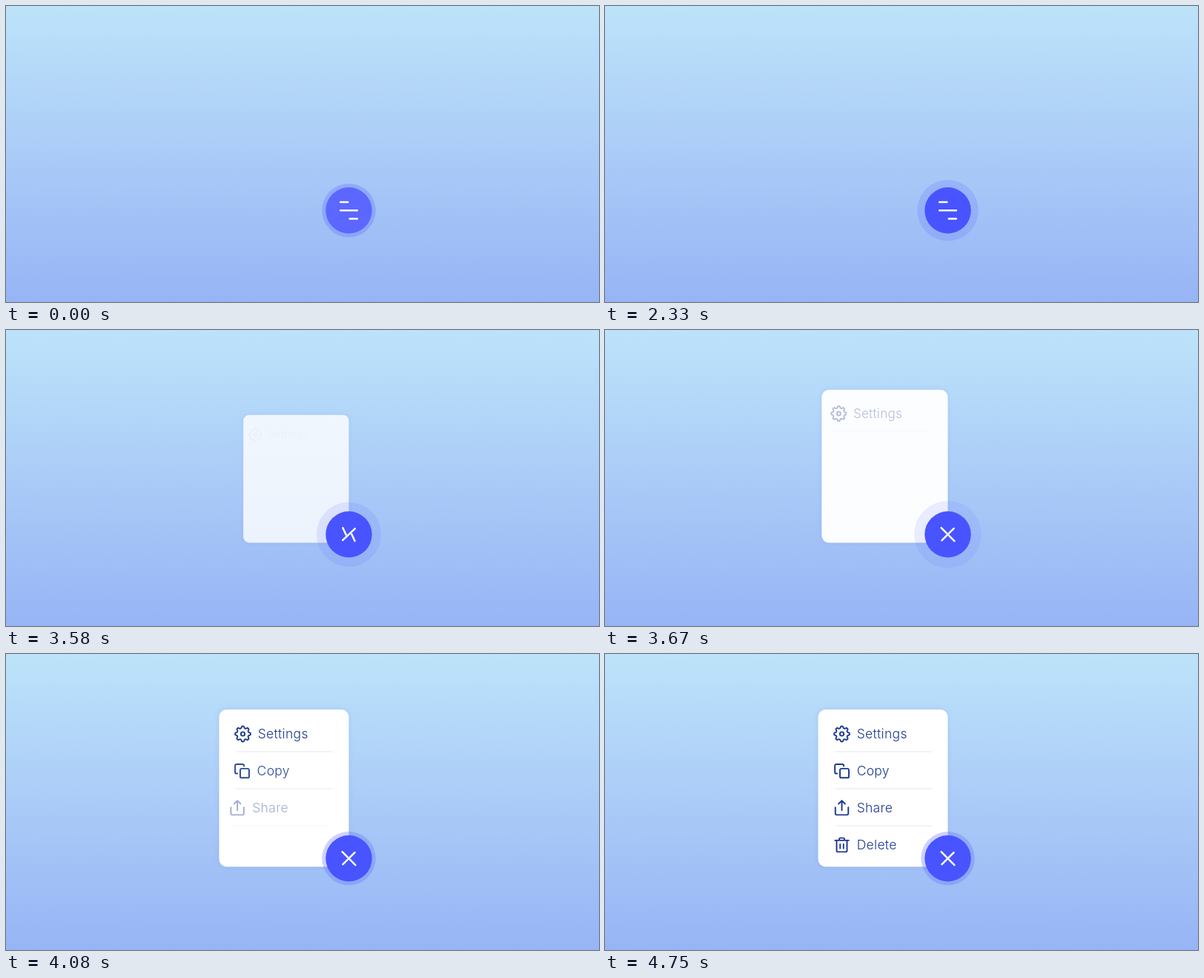
Write an HTML page that moves like this. It is 800x400 px and loops after 5.01 s.

```html
<!DOCTYPE html>
<html lang="en">
<head>
<meta charset="utf-8">
<title>Floating menu</title>
<style>
html, body { margin: 0; width: 100%; height: 100%; overflow: hidden; }
svg { display: block; width: 100vw; height: 100vh; background: linear-gradient(#bde3fa, #97b4f5); }
#card { fill: #fff; filter: drop-shadow(0 0 3px rgba(96, 128, 224, .22)); }
.icon { fill: none; stroke: #1c3a8f; stroke-width: 1.55; stroke-linecap: round; stroke-linejoin: round; }
text { font: 300 14px Inter, "Open Sans", sans-serif; letter-spacing: .25px; fill: #1c3a8f; }
#burger { fill: #fff; }
</style>
</head>
<body>
<svg viewBox="0 0 640 320">
  <g id="menu"><rect id="card" x="230" y="60" width="140" height="170" rx="8"/></g>
  <circle id="ring" cx="370" cy="221"/>
  <circle id="button" cx="370" cy="221" r="25"/>
  <g id="burger">
    <rect id="top" x="-10" y="-10" width="10" height="2" rx=".8"/>
    <rect x="-10" y="-1" width="20" height="2" rx=".8"/>
    <rect id="bottom" x="0" y="8" width="10" height="2" rx=".8"/>
  </g>
</svg>
<script>
const $ = id => document.getElementById(id);
const set = (el, attrs) => { for (const k in attrs) el.setAttribute(k, attrs[k]); };
const mix = (a, b, p) => a + (b - a) * p;

function bezier(x1, y1, x2, y2) {
  const at = (a, b, s) => 3 * (1 - s) ** 2 * s * a + 3 * (1 - s) * s * s * b + s ** 3;
  return x => {
    if (x <= 0) return 0;
    if (x >= 1) return 1;
    let lo = 0, hi = 1;
    for (let i = 0; i < 24; i++) {
      const mid = (lo + hi) / 2;
      if (at(x1, x2, mid) < x) lo = mid; else hi = mid;
    }
    return at(y1, y2, lo);
  };
}
const ease = bezier(.25, .1, .25, 1);
const easeOut = bezier(0, 0, .58, 1);
const windUp = bezier(.54, -.81, .57, .57);

// Gear outline with eight rounded teeth
const gear = 'M' + Array.from({ length: 128 }, (_, i) => {
  const a = i * Math.PI / 64;
  const r = 7.35 + 1.05 * Math.tanh(1.7 * Math.cos(8 * a));
  return (r * Math.cos(a)).toFixed(2) + ' ' + (r * Math.sin(a)).toFixed(2);
}).join('L') + 'Z';

const rows = [
  ['Settings', gear + 'M2.1 0A2.1 2.1 0 1 1-2.1 0A2.1 2.1 0 1 1 2.1 0'],
  ['Copy', 'M-.5-2.5H6.1a1.5 1.5 0 0 1 1.5 1.5V5.9a1.5 1.5 0 0 1-1.5 1.5H-.5A1.5 1.5 0 0 1-2 5.9V-1A1.5 1.5 0 0 1-.5-2.5Z' +
    'M-5 2.8h-1A1.5 1.5 0 0 1-7.5 1.3V-5.7A1.5 1.5 0 0 1-6-7.2H.6A1.5 1.5 0 0 1 2.1-5.7v.5'],
  ['Share', 'M-7-.6V6A1.5 1.5 0 0 0-5.5 7.5H5.5A1.5 1.5 0 0 0 7 6V-.6M0 2.6V-7.8M-3.5-4.4L0-7.9L3.5-4.4'],
  ['Delete', 'M-7.4-4.9H7.4M-2.8-5V-6.3A1.2 1.2 0 0 1-1.6-7.5H1.6A1.2 1.2 0 0 1 2.8-6.3V-5' +
    'M-5.6-4.8V6A1.5 1.5 0 0 0-4.1 7.5H4.1A1.5 1.5 0 0 0 5.6 6V-4.8M-1.8-.8V3.8M1.8-.8V3.8']
];

const items = rows.map(([label, path], i) => {
  const g = document.createElementNS('http://www.w3.org/2000/svg', 'g');
  const y = 86.4 + 40 * i;
  g.innerHTML = `<path class="icon" transform="translate(255.6 ${y})" d="${path}"/>
    <text x="271.7" y="${y + 4.9}">${label}</text>` +
    (i < 3 ? `<rect x="248.4" y="${y + 18.6}" width="104.4" height="1.2" fill="#eeeff4"/>` : '');
  $('menu').append(g);
  return g;
});

function ringAt(t) {
  if (t < 3325) {
    const p = ease((t - 2145) / 200);
    return [mix(4, 8, p), mix(.3, .2, p)];
  }
  const grow = ease((Math.min(t, 3750) - 3325) / 500);
  const back = ease((t - 3750) / 300);
  return [mix(12 * grow, 4, back), mix(mix(.3, .1, grow), .3, back)];
}

function draw(t) {
  const hover = ease((t - 2145) / 200);
  const [spread, alpha] = ringAt(t);
  set($('ring'), { r: 25 + spread, fill: `rgba(92,103,255,${alpha})` });
  set($('button'), { fill: `rgb(${mix(92, 72, hover)},${mix(103, 84, hover)},255)` });

  const turn = (t - 3328) / 300;
  const half = windUp(turn);
  set($('burger'), { transform: `translate(370 221) rotate(${-45 * easeOut(turn)})` });
  set($('top'), { transform: `translate(0 -9) rotate(${-90 * half}) translate(${2 * half} 9)` });
  set($('bottom'), { transform: `translate(0 9) rotate(${-90 * half}) translate(${-2 * half} -9)` });

  const open = ease((t - 3430) / 300);
  set($('menu'), { opacity: open, transform: `translate(370 230) scale(${open}) translate(-370 -230)` });
  items.forEach((g, i) => {
    const p = ease((t - 3558 - 200 * i) / 500);
    set(g, { opacity: p, transform: `translate(${-10 * (1 - p)} 0)` });
  });
}

// The motion advances at 12 steps per second
function tick() {
  const step = Math.min(59, Math.floor((performance.now() % 5010 + 4) * .012));
  draw(step * 1000 / 12);
  requestAnimationFrame(tick);
}
tick();
</script>
</body>
</html>
```
